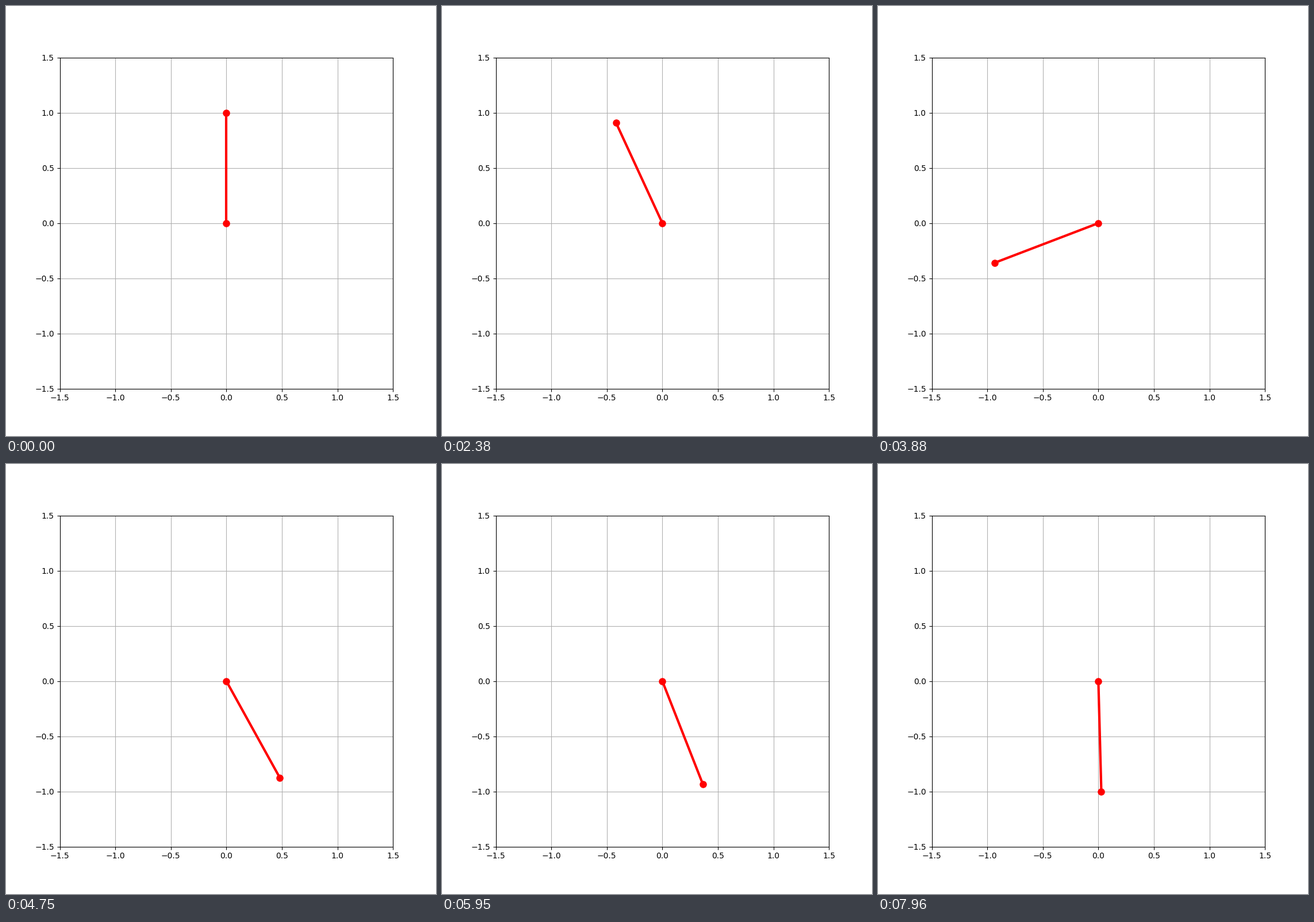
Recreate the animation shown at these times as a matplotlib script. Size 748 px wide and 748 px high, loop 7990 ms.

```python
import numpy as np
import matplotlib.pyplot as plt
from matplotlib.animation import FuncAnimation

SIZE, DPI = 748, 100
LOOP, INTERVAL = 7990, 17        # ms
FIRST_MOVE, HOLD = 670, 30       # ms: start of motion, length of one pose
G, DAMPING = 9.8, 0.5
H = 0.005                        # integration step in s

# Known poses: time in ms, angle in degrees from straight down,
# direction of travel, how many earlier passes in that direction
KEYS = [
    (3040, 76.5, 1, 0),
    (4750, 28.9, -1, 1),
    (5950, 21.3, -1, 2),
    (6730, 0.5, 1, 3),
    (7960, 1.6, 1, 4),
]


def slope(state):
    angle, speed = state
    return np.array([speed, -G * np.sin(angle) - DAMPING * speed])


def swing(duration=17.0, nudge=1e-6):
    """Damped fall from the upright position, by Runge-Kutta."""
    growth = -DAMPING / 2 + np.sqrt(DAMPING ** 2 / 4 + G)
    state = np.array([-np.pi + nudge, growth * nudge])
    angles = [state[0]]
    for _ in range(int(duration / H)):
        k1 = slope(state)
        k2 = slope(state + H / 2 * k1)
        k3 = slope(state + H / 2 * k2)
        k4 = slope(state + H * k3)
        state = state + H / 6 * (k1 + 2 * k2 + 2 * k3 + k4)
        angles.append(state[0])
    return np.array(angles)


def passing_time(angles, degrees, direction, nth):
    gap = direction * (angles - np.radians(degrees))
    i = np.flatnonzero((gap[:-1] < 0) & (gap[1:] >= 0))[nth]
    return H * (i - gap[i] / (gap[i + 1] - gap[i]))


angles = swing()
times = H * np.arange(len(angles))
clock = np.polyfit([key[0] for key in KEYS],
                   [passing_time(angles, *key[1:]) for key in KEYS], 1)


def angle_at(ms):
    if ms < FIRST_MOVE:
        return -np.pi
    held = ms - (ms - FIRST_MOVE) % HOLD
    return np.interp(np.polyval(clock, held), times, angles)


fig, ax = plt.subplots(figsize=(SIZE / DPI, SIZE / DPI), dpi=DPI)
ax.set_xlim(-1.5, 1.5)
ax.set_ylim(-1.5, 1.5)
ax.grid()
rod, = ax.plot([], [], "o-", color="red", lw=3, markersize=8)


def draw(i):
    angle = angle_at(i * INTERVAL + INTERVAL - 1)
    rod.set_data([0, np.sin(angle)], [0, -np.cos(angle)])
    return rod,


anim = FuncAnimation(fig, draw, frames=LOOP // INTERVAL, interval=INTERVAL,
                     repeat=True, repeat_delay=0)
plt.show()
```
